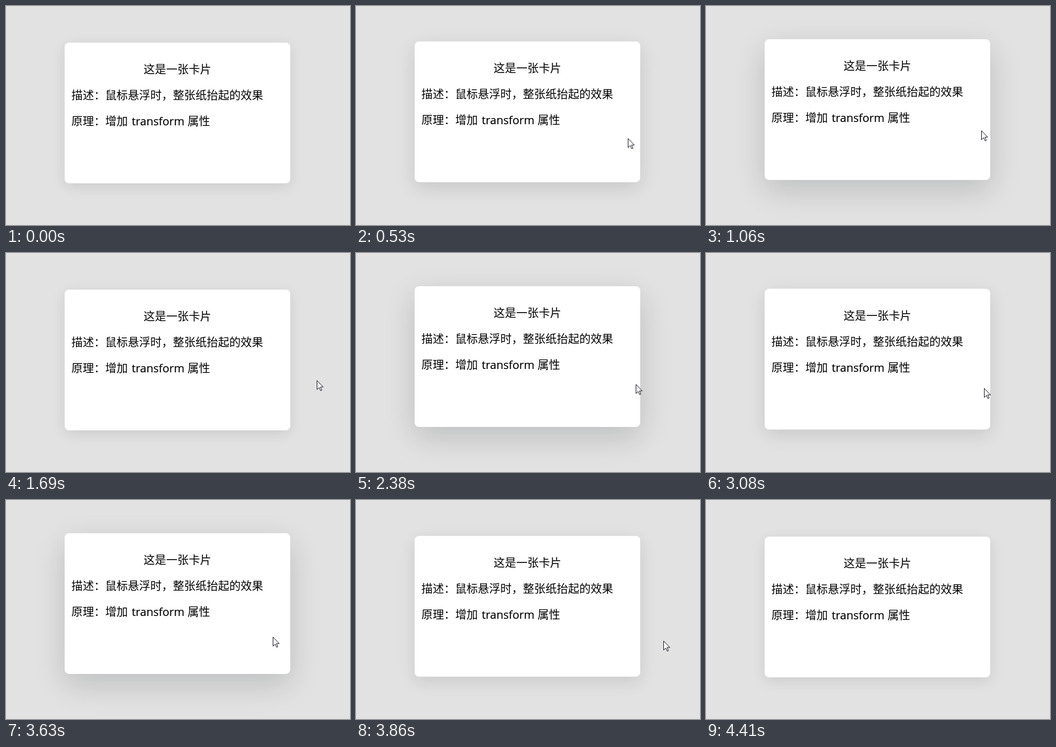
An HTML page for the animation above (4.79 s loop, 610 by 389 pixels).

```html
<!DOCTYPE html>
<html lang="zh-CN">
<head>
<meta charset="utf-8">
<title>卡片</title>
<style>
  html, body { margin: 0; width: 100%; height: 100%; overflow: hidden; background: #e2e2e2; }
  #card { position: absolute; left: 104px; top: 65px; width: 400px; height: 250px; border-radius: 8px; background: #fff; }
  svg { display: block; overflow: visible; }
  text { font: 350 20px "Noto Sans CJK SC", "Noto Sans CJK", sans-serif; }
  .latin { font: 20px "Open Sans", "Noto Sans", sans-serif; stroke: #000; stroke-width: .2px; }
  #cursor { position: absolute; left: 0; top: 0; }
</style>
</head>
<body>
<div id="card">
  <svg width="400" height="250">
    <text x="140" y="55">这是一张卡片</text>
    <text x="12" y="101">描述：鼠标悬浮时，整张纸抬起的效果</text>
    <text x="12" y="147">原理：增加</text>
    <text x="119" y="147" class="latin">transform</text>
    <text x="218" y="147">属性</text>
  </svg>
</div>
<svg id="cursor" width="13" height="20">
  <path d="M.5 1.5V17.5L4.3 14 6.9 19.6 9.1 18.6 6.6 13H11.5Z" fill="#fff" stroke="#101020"/>
</svg>
<script>
const LOOP = 4790, FRAME = 75, RISE = 300;
const card = document.getElementById('card');
const cursor = document.getElementById('cursor');

const linear = p => p;
const smooth = p => p * p * (3 - 2 * p);
const slowing = p => Math.sin(p * Math.PI / 2);

// Pointer moves; each one sets out from where the last ended
const entry = { x: 611, y: 348 };
const moves = [
  { start: 70, end: 590, x: 464, y: 218, ease: linear },
  { start: 680, end: 770, x: 464, y: 218 },
  { start: 1000, end: 1370, x: 557, y: 225 },
  { start: 1690, end: 2070, x: 472, y: 230 },
  { start: 2300, end: 2700, x: 565, y: 238 },
  { start: 2930, end: 3400, x: 449, y: 239, ease: slowing },
  { start: 3560, end: 4030, x: 569, y: 252 },
  { start: 4090, end: 4410, x: 574, y: 400 }
];

// Times at which the pointer enters and leaves the card
const hovers = [[450, 1070], [1768, 2390], [3033, 3725]];

const pose = (t, up) => ({
  offset: t / LOOP,
  easing: 'ease',
  transform: `translateY(${up ? -6 : 0}px)`,
  boxShadow: up ? '0 18px 54px rgba(0,12,16,.165)' : '0 6px 24px rgba(0,0,0,.1)'
});
const lift = card.animate([
  pose(0, 0),
  ...hovers.flatMap(([a, b]) => [pose(a, 0), pose(a + RISE, 1), pose(b, 1), pose(b + RISE, 0)]),
  pose(LOOP, 0)
], LOOP);
lift.pause();

function place(point) {
  cursor.style.transform = `translate(${Math.round(point.x)}px,${Math.round(point.y)}px)`;
}

function show(t) {
  const i = moves.findLastIndex(m => m.start <= t);
  if (i < 0) {
    lift.currentTime = 0;
    return place(entry);
  }
  const { start, end, x, y, ease = smooth } = moves[i];
  const from = moves[i - 1] || entry;
  // The picture advances in even steps while something moves, then holds
  const steps = Math.round((end - start) / FRAME);
  const dt = (end - start) / steps;
  const k = Math.min(steps, Math.floor((t - start) / dt + 0.25));
  const p = ease((k + 1) / (steps + 1));
  lift.currentTime = start + k * dt;
  place({ x: from.x + (x - from.x) * p, y: from.y + (y - from.y) * p });
}

const origin = performance.now();
function draw() {
  show((performance.now() - origin) % LOOP);
  requestAnimationFrame(draw);
}
draw();
</script>
</body>
</html>
```
